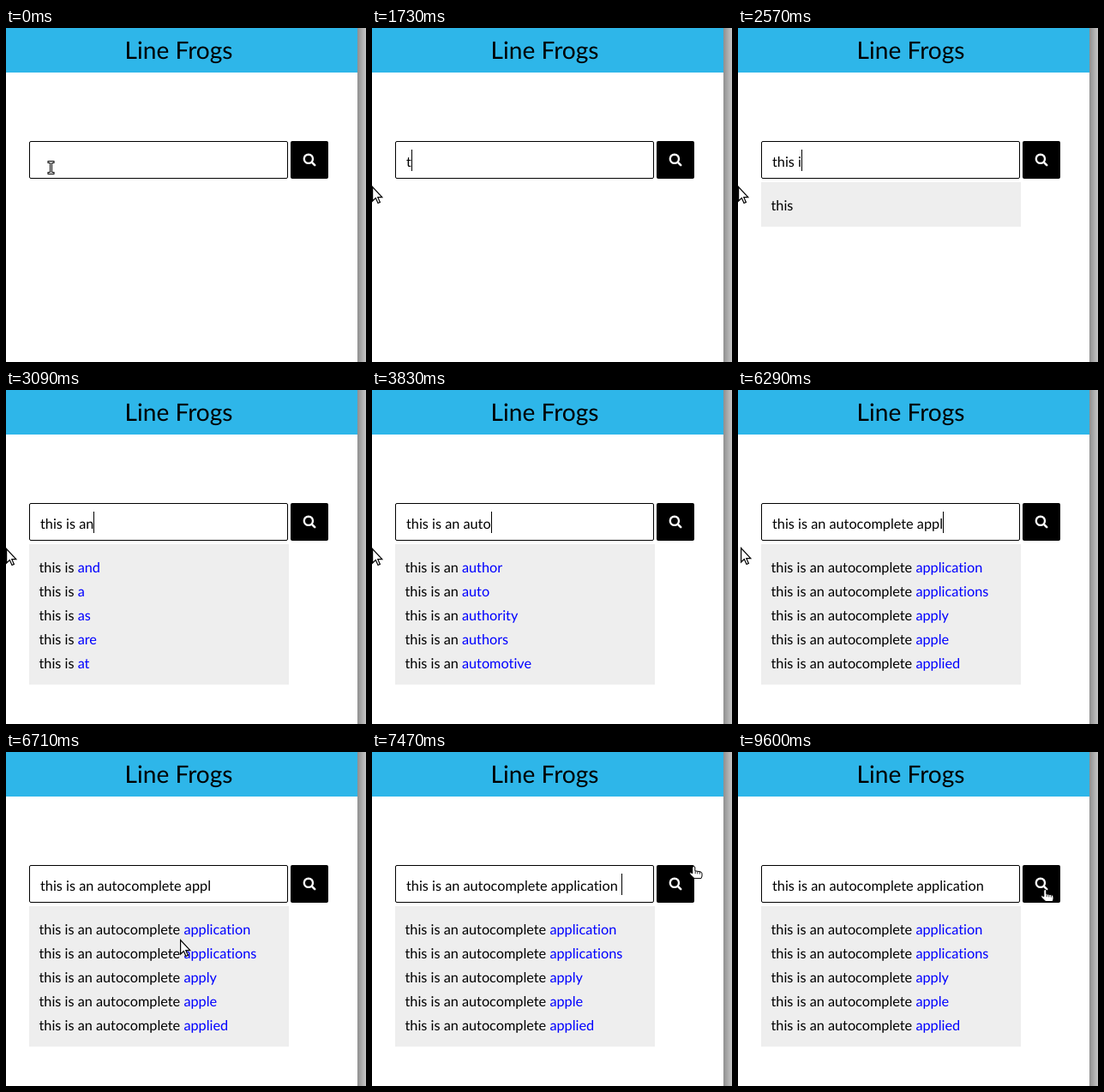
An HTML page that plays this animation: 420x390 px, repeating every 9.62 s.

```html
<!DOCTYPE html>
<html lang="en">
<head>
<meta charset="utf-8">
<title>Line Frogs</title>
<style>
html, body { margin: 0; width: 100%; height: 100%; overflow: hidden; background: #fff; }
svg { display: block; width: 100%; height: 100%; }
text {
  font: 16.27px Lato, "Open Sans", sans-serif;
  font-variant-ligatures: none;
  white-space: pre;
  text-rendering: geometricPrecision;
}
#title { font-size: 28.1px; text-anchor: middle; }
.word { fill: #00f; }
#cursor g { display: none; }
#cursor g.on { display: inline; }
</style>
</head>
<body>
<svg viewBox="0 0 420 390" preserveAspectRatio="xMinYMin meet">
  <defs>
    <linearGradient id="shade">
      <stop offset="0" stop-color="#8f8f8f"/>
      <stop offset="1" stop-color="#c6c6c6"/>
    </linearGradient>
  </defs>
  <rect width="410" height="390" fill="#fff"/>
  <rect width="410" height="52" fill="#2eb6e9"/>
  <rect x="410" width="10" height="390" fill="url(#shade)"/>
  <text id="title" x="201.5" y="36">Line Frogs</text>

  <rect x="27.5" y="132.5" width="301" height="43" rx="1.5" fill="#fff" stroke="#000"/>
  <text id="field" x="40" y="162"></text>
  <rect id="caret" y="142" width="1" height="25"/>

  <rect x="332" y="132" width="44" height="44" rx="2"/>
  <g fill="none" stroke="#fff">
    <circle cx="352.9" cy="152.8" r="5.1" stroke-width="2.4"/>
    <path d="M356.9 156.8l3.3 3.3" stroke-width="2.6" stroke-linecap="round"/>
  </g>

  <rect id="panel" x="27" y="180" width="303" fill="#eee"/>
  <g id="rows"></g>

  <g id="cursor">
    <g id="beam" fill="none" stroke-linecap="square">
      <path d="M-2 -6.5h5M.5 -6.5v13M-2 6.5h5" stroke="#000" stroke-width="3"/>
      <path d="M-2 -6.5h5M.5 -6.5v13M-2 6.5h5" stroke="#fff"/>
    </g>
    <g id="arrow" fill="#fff" stroke="#000" stroke-width="1.2">
      <path d="M.6 .6V17l3.7-3.5 2.7 6 2.4-1.1-2.6-5.7h5z"/>
    </g>
    <g id="hand" fill="#fff" stroke="#000" transform="translate(-1 1)">
      <path d="M-1.2 2a1.5 1.5 0 0 1 3 0V5.8l6.2 1q2 .5 2 2.2V12l-1 2.6H1L-4 9.8Q-5 8 -3.2 7.6L-1.2 8.8z"/>
      <path d="M2.2 6.2v3M4.8 6.8v2.6M7.4 7v2.6" stroke-width=".8"/>
    </g>
  </g>
</svg>
<script>
const LOOP = 9620, LAG = 40;
const phrase = 'this is an autocomplete appl';
const keyTimes = [
  1730, 1830, 1930, 2230, 2390, 2570, 2710, 2830, 2960, 3070, 3180, 3260, 3460, 3660,
  3830, 3960, 4080, 4280, 4470, 4630, 4750, 4830, 4910, 5110, 5270, 5390, 5490, 5610
];
const PICK = 7140; // suggestion clicked
const hints = {
  t: 'the to that this they',
  th: 'the that this they their',
  thi: 'this think things thing third',
  this: 'this thistledown',
  i: 'in is it information if',
  is: 'is issue issues island isolated',
  a: 'and a as are at',
  an: 'and an any another analysis',
  au: 'august author audio authors aug',
  aut: 'author auto authority authors automotive',
  auto: 'auto automotive automatically automatic automated',
  ap: 'application applications april apply apr',
  app: 'application applications apply appear approach',
  appl: 'application applications apply apple applied'
};
const caretOn = [[440, 1160], [1730, 6360], [PICK, 8100], [8850, 9600]];

// start, end, from, to, downward bow
const moves = [
  [840, 1160, [52, 163], [0, 185], 0],
  [6290, 6930, [0, 184], [284, 213], 24],
  [7230, 7470, [284, 213], [376, 132], 0],
  [7630, 7830, [376, 132], [359, 158], 0],
  [8100, 8100, [359, 158], [359, 159], 0]
];

const $ = id => document.getElementById(id);
const ease = p => p * p * (3 - 2 * p);
const inside = (x, y, l, t, r, b) => x >= l && x <= r && y >= t && y <= b;

function pointer(t) {
  let [x, y] = moves[0][2];
  for (const [t0, t1, a, b, bow] of moves) {
    if (t < t0) break;
    const steps = (t1 - t0) / 40 + 1;
    const p = ease(Math.min(1, (Math.floor((t - t0) / 40) + 1) / steps));
    x = a[0] + (b[0] - a[0]) * p;
    y = a[1] + (b[1] - a[1]) * p + bow * Math.sin(Math.PI * p) ** 2;
  }
  return [Math.round(x), Math.round(y)];
}

function pointerShape(x, y) {
  if (inside(x, y, 27, 132, 329, 176)) return 'beam';
  if (inside(x, y, 332, 132, 376, 176) || inside(x, y, 208, 194, 286, 330)) return 'hand';
  return 'arrow';
}

// rows as [prefix, suggested word]
function suggest(query) {
  if (!query) return [];
  const cut = query.lastIndexOf(' ') + 1;
  const words = hints[query.slice(cut)];
  return words ? words.split(' ').map(w => [query.slice(0, cut), w]) : [[query.trim(), '']];
}

let shown = null;
function showRows(query) {
  if (query === shown) return;
  shown = query;
  const rows = suggest(query);
  $('panel').setAttribute('height', rows.length ? 24 + 28 * rows.length : 0);
  $('rows').innerHTML = rows.map(([head, word], i) =>
    `<text x="38.5" y="${213 + 28 * i}">${head}<tspan class="word">${word}</tspan></text>`).join('');
}

const typedBy = t => phrase.slice(0, keyTimes.filter(k => k <= t).length);

function draw(t) {
  const field = $('field');
  const value = t < PICK ? typedBy(t) : phrase + 'ication ';
  if (field.textContent !== value) field.textContent = value;
  showRows(typedBy(t - LAG));

  const lit = caretOn.some(([a, b]) => t >= a && t < b);
  const width = value ? field.getComputedTextLength() : 0;
  $('caret').setAttribute('x', Math.round(40 + width));
  $('caret').setAttribute('visibility', lit ? 'visible' : 'hidden');

  const [x, y] = pointer(t), shape = pointerShape(x, y);
  $('cursor').setAttribute('transform', `translate(${x} ${y})`);
  for (const g of $('cursor').children) g.classList.toggle('on', g.id === shape);
}

function tick() {
  draw(performance.now() % LOOP);
  requestAnimationFrame(tick);
}
tick();
</script>
</body>
</html>
```
